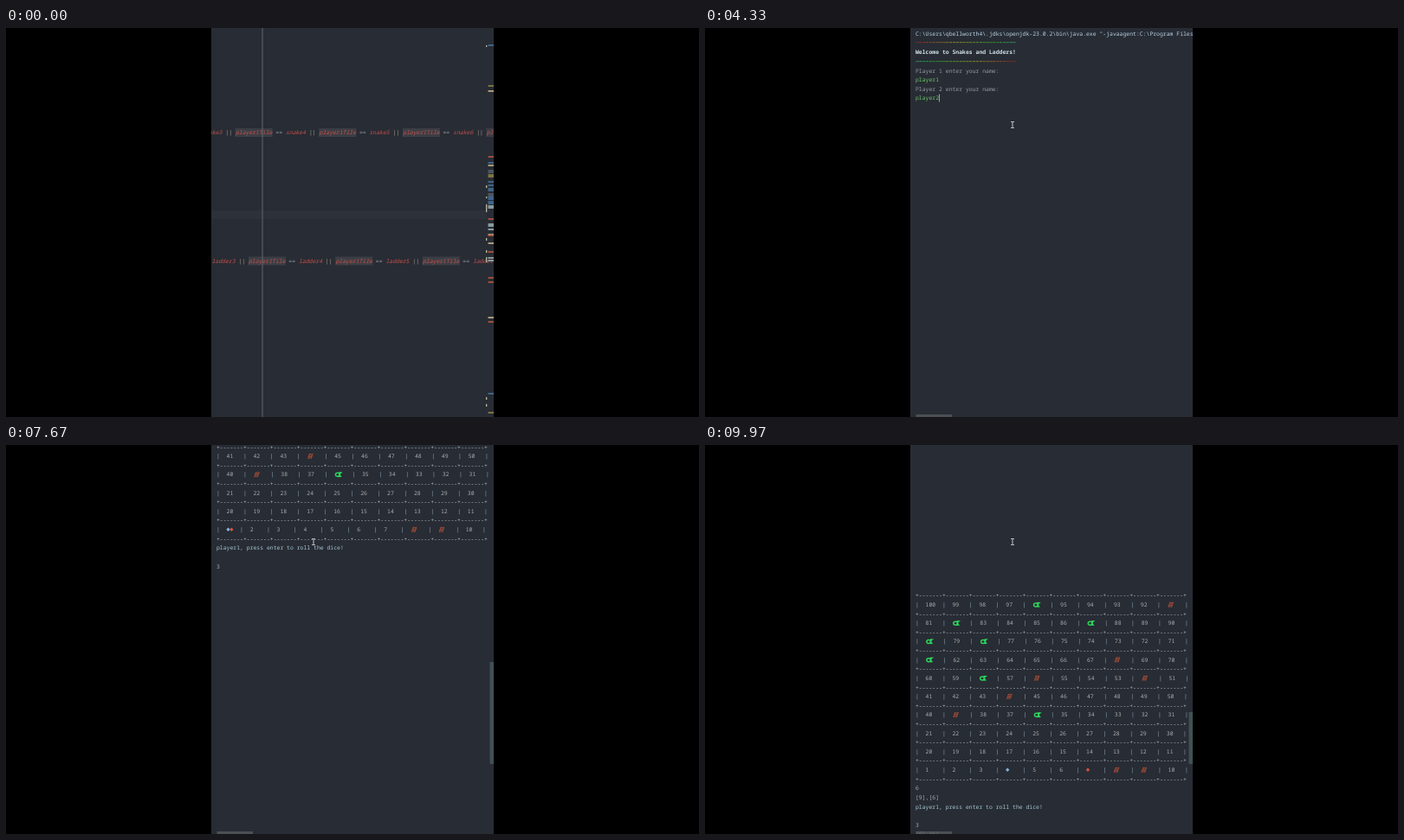
An HTML page with a canvas that plays this animation: 800 by 450 pixels, repeating every 10000 ms.

```html
<!DOCTYPE html>
<html lang="en">
<head>
<meta charset="utf-8">
<title>Snakes and Ladders console</title>
<style>
html, body { margin: 0; width: 100%; height: 100%; overflow: hidden; background: #000; }
canvas { display: block; }
</style>
</head>
<body>
<canvas id="stage" width="800" height="450"></canvas>
<script>
const ctx = document.getElementById('stage').getContext('2d');
const LOOP = 10000, LEFT = 237, RIGHT = 563, X0 = 243, CH = 3.864, LINE = 10.62;
const FONT = '6.44px "Noto Sans Mono", monospace';
const BG = '#282c34', GREY = '#a9adb3', PALE = '#b9d3e6', BAR = '#8fb0c4', GREEN = '#6cc36c';
const RED = '#d2553f', BLUE = '#7fb5dc', CARET = '#4a90d0';
const SNAKES = [96, 82, 87, 80, 78, 61, 58, 36];
const LADDERS = [91, 68, 56, 52, 44, 39, 8, 9];

function rect(x, y, w, h, color) {
  ctx.fillStyle = color;
  ctx.fillRect(x, y, w, h);
}

function text(str, x, y, color, style = '') {
  ctx.font = `${style} ${FONT}`;
  ctx.fillStyle = color;
  ctx.fillText(str, x, y + 2.3);
}

function snake(x, y) {
  ctx.strokeStyle = '#2cd45c';
  ctx.lineWidth = 1.5;
  ctx.beginPath();
  ctx.ellipse(x + 3.6, y + .3, 2.3, 2, 0, 0, 7);
  ctx.moveTo(x + 3.6, y + 2.5);
  ctx.lineTo(x + 7.2, y + 2.3);
  ctx.quadraticCurveTo(x + 5, y - .5, x + 7.4, y - 2);
  ctx.lineTo(x + 5.2, y - 2.2);
  ctx.stroke();
}

function ladder(x, y) {
  ctx.strokeStyle = '#a04c37';
  ctx.lineWidth = .9;
  ctx.beginPath();
  for (const dx of [1.2, 4.9]) {
    ctx.moveTo(x + dx, y + 3);
    ctx.lineTo(x + dx + 2, y - 3);
  }
  for (let i = 0; i < 4; i++) {
    ctx.moveTo(x + 1.2 + i * .5, y + 2.3 - i * 1.5);
    ctx.lineTo(x + 5.3 + i * .5, y + 2.3 - i * 1.5);
  }
  ctx.stroke();
}

function token(x, y, color) {
  ctx.fillStyle = color;
  ctx.beginPath();
  ctx.moveTo(x - .3, y);
  ctx.lineTo(x + 1.9, y - 2.2);
  ctx.lineTo(x + 4.1, y);
  ctx.lineTo(x + 1.9, y + 2.2);
  ctx.fill();
}

// Draws one cell's content and returns its advance
function cell(n, x, y, tokens) {
  const here = tokens.filter(t => t[0] === n);
  here.forEach((t, i) => token(x + i * CH, y, t[1]));
  if (here.length) return (here.length > 1 ? 4 : 5) * CH;
  if (SNAKES.includes(n) || LADDERS.includes(n)) {
    (SNAKES.includes(n) ? snake : ladder)(x, y);
    return 5 * CH + .9;
  }
  text(String(n), x, y, GREY);
  return 5 * CH;
}

function board(top, tokens) {
  const border = '+-------'.repeat(10) + '+';
  for (let r = 0; r <= 10; r++) {
    const y = top + 2 * r * LINE;
    if (y < -20 || y > 460) continue;
    text(border, X0, y, '#aeb9bd');
    if (r === 10) break;
    const low = 91 - r * 10, descending = [0, 2, 4, 6, 8].includes(r);
    let x = X0;
    for (let c = 0; c < 10; c++) {
      text('|', x, y + LINE, BAR);
      x += 3 * CH;
      x += cell(descending ? low + 9 - c : low + c, x, y + LINE, rowTokens(r, tokens));
    }
    text('|', x, y + LINE, BAR);
  }
}
const rowTokens = (r, tokens) => r === 9 ? tokens : [];

function rainbow(y, reversed) {
  for (let i = 0; i < 30; i++) {
    const k = (reversed ? 29 - i : i) / 29;
    text('~', X0 + i * CH, y, `hsl(${k * 150}, 62%, ${44 + 8 * k}%)`, 'bold');
  }
}

// Console output: [appears, y in the document, draw]
const say = (t, y, str, color = GREY, style) => [t, y, v => text(str, X0, v, color, style)];
const B0 = 846, B1 = 1662, B2 = 2491;
const prompt = p => `player${p}, press enter to roll the dice!`;
const output = [
  say(610, 7, 'C:\\Users\\qbellworth4\\.jdks\\openjdk-23.0.2\\bin\\java.exe "-javaagent:C:\\Program Files', PALE),
  [900, 17, v => rainbow(v, false)],
  say(900, 28, 'Welcome to Snakes and Ladders!', '#cfe0ea', 'bold'),
  [900, 38.5, v => rainbow(v, true)],
  say(900, 49.2, 'Player 1 enter your name:', '#959da5'),
  say(2550, 70.5, 'Player 2 enter your name:', '#959da5'),
  [5700, B0, v => board(v, [[1, BLUE], [1, RED]])],
  say(5700, B0 + 21 * LINE, prompt(1), '#a6c6d4'),
  say(7300, B0 + 23 * LINE, '3'),
  [7700, B1, v => board(v, [[1, RED], [4, BLUE]])],
  say(7700, B1 + 21 * LINE, '3'),
  say(7700, B1 + 22 * LINE, '[9],[6]'),
  say(7700, B1 + 23 * LINE, prompt(2), '#a6c6d4'),
  say(9100, B1 + 25 * LINE, '6'),
  [9450, B2, v => board(v, [[4, BLUE], [7, RED]])],
  say(9450, B2 + 21 * LINE, '6'),
  say(9450, B2 + 22 * LINE, '[9],[6]'),
  say(9450, B2 + 23 * LINE, prompt(1), '#a6c6d4'),
  say(9910, B2 + 25 * LINE, '3'),
  say(9910, B2 + 26 * LINE, '[9],[6]'),
];

// [from, scroll offset, thumb top, thumb height, caret y or 0]
const views = [
  [0, 0, 0, 0, 0],
  [5200, 330, 170, 236, 0],
  [5700, 605, 250, 186, 0],
  [6400, 640, 264, 186, 439.5],
  [7300, 950, 251, 118, 0],
  [7700, 1478, 345, 105, 439.5],
  [9100, 1788.5, 320, 81, 0],
  [9450, 2306, 374, 76, 439.5],
  [9910, 2317, 309, 60, 0],
];

const typing = [
  ['player1', 60, [1700, 1810, 1920, 2030, 2140, 2250, 2370], 2550],
  ['player2', 81, [3450, 3570, 3720, 3830, 3940, 4050, 4250], 5200],
];

function pointer(x, y) {
  rect(x - .5, y - 3, 1, 6.5, '#c3c6ca');
  rect(x - 2, y - 4, 4, 1, '#b4b8bc');
  rect(x - 2, y + 3, 4, 1, '#b4b8bc');
}

function consoleView(t) {
  const [, scroll, thumbTop, thumbHeight, caretY] = views.filter(v => t >= v[0]).pop();
  for (const [from, y, draw] of output) {
    const v = y - scroll;
    if (t >= from && v > -240 && v < 460) draw(v);
  }
  for (const [word, y, keys, enter] of typing) {
    const n = keys.filter(k => t >= k).length;
    if (!n) continue;
    text(word.slice(0, n), X0, y - scroll, GREEN);
    if (t < enter) rect(X0 + n * CH, y - 4.5, .8, 9, '#b8c4c0');
  }
  if (caretY) rect(X0, caretY - 4.5, 1, 9, CARET);
  if (thumbHeight) rect(558.5, thumbTop, 4.5, thumbHeight, 'rgba(75, 97, 99, .7)');
  if (t >= 610) {
    rect(243.5, 447, 41.5, 3, 'rgba(88, 91, 95, .75)');
    pointer(355, 112);
  }
}

function condition(x, y, name, first) {
  const rose = '#c9504a';
  text(name + first, x, y, rose, 'italic');
  x += (name.length + 1) * CH;
  for (let i = first + 1; i < first + 5; i++) {
    text(' || ', x, y, '#a9a48c');
    x += 4 * CH;
    rect(x - .3, y - 5, 11 * CH + .6, 10, '#3c3e45');
    text('player1Tile', x, y, rose, 'italic');
    x += 11 * CH;
    text(' == ', x, y, '#9da5ab');
    x += 4 * CH;
    text(name + i, x, y, rose, 'italic');
    x += (name.length + 1) * CH;
  }
}

const stripes = {
  '#4472a0': [20, 156, 178, 182, 186, 188, 196, 198, 201, 203, 423],
  '#8d8545': [67, 170, 172, 445],
  '#c9b48a': [73, 159, 239, 249, 335],
  '#b5583f': [149, 221, 240, 259, 289, 294, 340],
  '#9fb3b4': [206, 208, 227, 229, 233, 266, 269],
  '#55606c': [165, 167, 192, 194],
};
const ticks = [[20, 2], [182, 3], [195, 2], [204, 9], [243, 3], [257, 3], [265, 6], [427, 3], [435, 3]];

function editor() {
  rect(LEFT, 211, 318, 10, '#2d313a');
  condition(226.3, 121, 'snake', 3);
  condition(237.5, 269.5, 'ladder', 3);
  rect(295.5, 0, 1, 450, '#62666c');
  for (const color in stripes)
    for (const y of stripes[color]) rect(556.5, y - .8, 6.5, 1.6, color);
  for (const [y, h] of ticks) rect(554, y, 1.3, h, '#b7b9a4');
}

function frame(now) {
  const t = now % LOOP;
  rect(0, 0, 800, 450, '#000');
  ctx.save();
  ctx.beginPath();
  ctx.rect(LEFT, 0, RIGHT - LEFT, 450);
  ctx.clip();
  rect(LEFT, 0, RIGHT - LEFT, 450, BG);
  if (t < 30) editor();
  else consoleView(t);
  ctx.restore();
  requestAnimationFrame(frame);
}

ctx.textRendering = 'geometricPrecision';
const start = performance.now();
requestAnimationFrame(now => frame(Math.max(0, now - start)));
</script>
</body>
</html>
```
